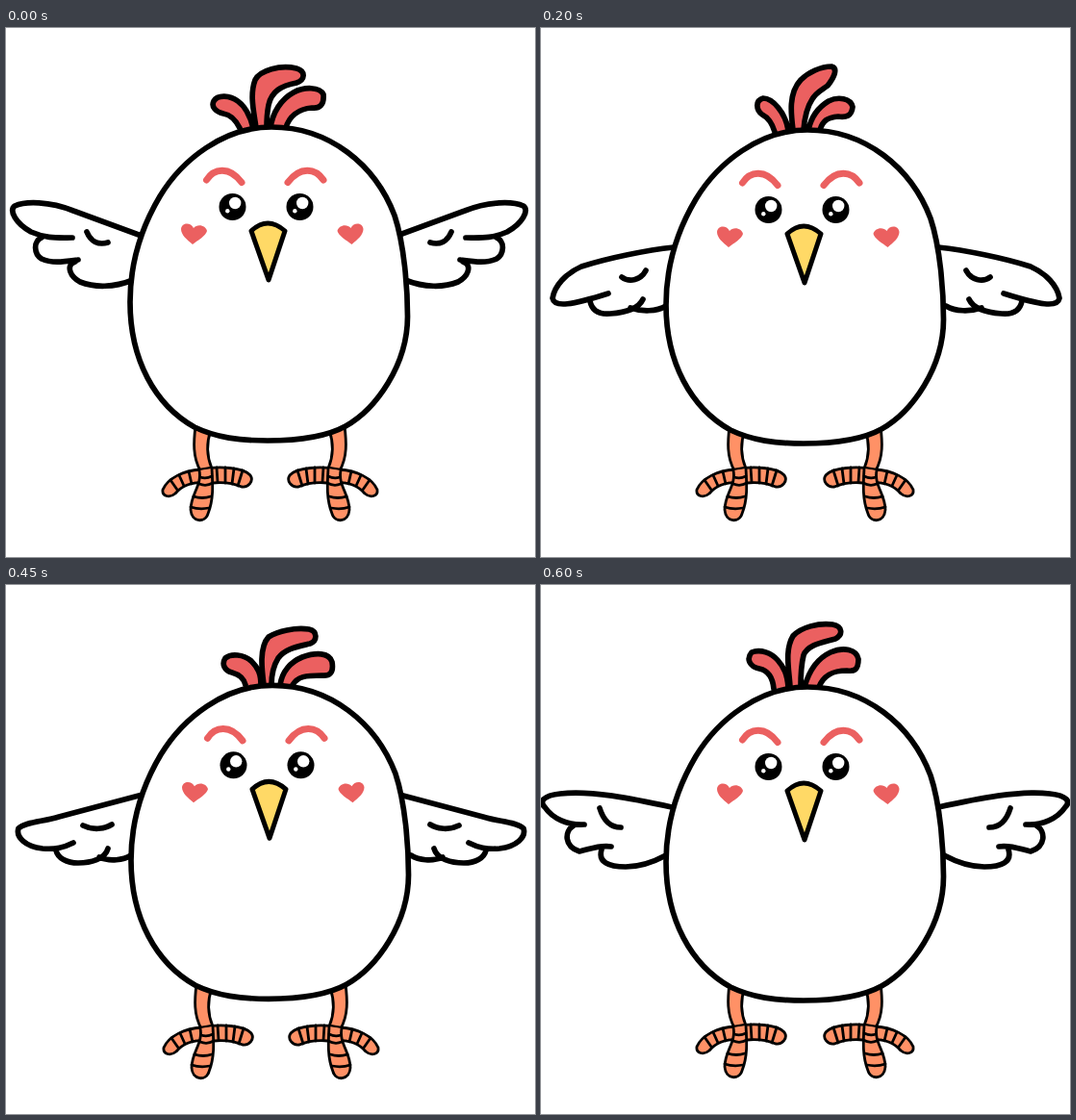
These frames come from a looping animation (550 by 550 pixels, 0.65 s). An HTML page:

```html
<!DOCTYPE html>
<html lang="en">
<head>
<meta charset="utf-8">
<title>Flapping chick</title>
<style>
  html, body { margin: 0; width: 100%; height: 100%; overflow: hidden; background: #fff; }
  svg { display: block; width: 100%; height: 100%; }
  .line { fill: none; stroke: #000; stroke-width: 5.7; stroke-linecap: round; stroke-linejoin: round; }
  .white { fill: #fff; }
  .red { fill: #eb6060; }
  .foot { fill: #ff9166; stroke: #000; stroke-width: 2.8; stroke-linecap: round; stroke-linejoin: round; }
  .brow { fill: none; stroke: #eb6060; stroke-width: 7; stroke-linecap: round; }
</style>
</head>
<body>
<svg viewBox="0 0 550 550">
  <defs>
    <g id="foot" class="foot">
      <path d="M197 414C195 430 194 446 202 460L214 458C209 446 208 432 213 418"/>
      <path d="M163 480C168 468 185 460 202 459C222 455 247 457 254 465C258 471 252 478 245 477C238 474 226 472 215 473C200 471 185 473 176 484C170 489 162 487 163 480Z"/>
      <path d="M201 460C204 476 192 484 192 501C193 514 207 515 210 505C216 490 215 475 214 458"/>
      <path fill="none" d="M171 470L178 480M180 465L185 476M190 461L193 474M219 457L220 472M228 457L228 473M237 458L235 474M246 460L241 476M201 474Q208 477 215 473M202 467Q208 469 214 466M195 487Q204 490 213 487M192 498Q201 501 211 499"/>
    </g>
    <g id="eye">
      <circle r="14"/>
      <circle class="white" cx="2.7" cy="-4" r="6.2"/>
      <circle class="white" cx="-5.2" cy="4.2" r="2.2"/>
    </g>
    <path id="heart" class="red" d="M194 225C188 220 182 215 182 209C183 202 192 202 195 208C199 203 208 205 209 211C208 216 199 221 194 225Z"/>
    <path id="wing" class="line"/>
  </defs>

  <use href="#wing"/>
  <use href="#wing" id="rightWing"/>
  <use href="#foot" id="leftFoot"/>
  <use href="#foot" id="rightFoot"/>
  <path id="comb" class="line red"/>
  <g id="body">
    <path class="line white" d="M276 103C226 103 183 137 160 175C138 212 129 250 129 285C129 345 155 392 196 415C219 426 243 429 272 429C305 429 333 425 353 414C385 396 417.5 350 417.5 300C417.5 270 414 225 404 195C384 142 336 103 276 103Z"/>
    <path class="brow" d="M208.500 158C216 146 232 143 245 160.500M330 158C322 146 306 143 293 160.500"/>
    <use href="#eye" x="235.500" y="186"/>
    <use href="#eye" x="305.500" y="186"/>
    <use href="#heart"/>
    <use href="#heart" transform="translate(553.500) scale(-1 1)"/>
    <path class="line" style="fill:#ffd966;stroke-width:5" d="M255 211Q272 195 290 211L273 262Z"/>
  </g>
</svg>
<script>
  const poses = {
    up: {
      body: [0, 0], leftFoot: [0, 0], rightFoot: [0, 0], mirror: 547,
      wing: 'M138 215L70 190C45 180 20 180 9 185C3 190 10 203 26 212C42 219 52 218 69 218M37 218C28 222 29 235 37 240C48 245 60 243 75 241M72 243C62 246 66 258 77 264C92 270 112 270 132 262M84 212C88 222 96 226 106 223',
      comb: 'M243 104C238 94 233 90 226 89C218 87 213 82 216 76C220 69 233 70 241 76C248 81 253 88 257 104M260 104C258 88 253 70 259 54C264 44 285 38 302 42C312 45 311 54 302 57C286 60 276 66 273 80C271 90 271 97 271 104M275 104C277 88 286 74 299 67C310 61 326 61 330 69C331 80 326 84 318 83C304 84 294 92 291 104'
    },
    falling: {
      body: [1, 1.3], leftFoot: [1, 1], rightFoot: [1, 1], mirror: 551,
      wing: 'M138 219L55 241C40 246 20 246 13 253C10 262 20 272 38 274C52 275 60 273 70 268M52 276C54 284 63 289 75 289C88 289 103 285 106 274M97 283C108 288 122 286 130 281M80 250C90 255 102 254 110 249',
      comb: 'M249 104C247 96 242 93 235 91C227 89 224 82 228 76C234 71 247 72 255 79C262 86 265 92 265 104M268 104C266 88 263 65 273 54C283 48 300 44 315 46C324 48 324 58 316 61C303 64 290 66 283 76C278 84 276 94 276 104M285 104C287 90 296 80 308 75C322 70 336 70 339 80C341 92 336 95 328 94C312 94 303 95 298 104'
    },
    down: {
      body: [1, 3], leftFoot: [-1, 0], rightFoot: [1, 0], mirror: 551,
      wing: 'M138 228C110 231 70 239 42 248C26 255 14 268 12 281C14 291 32 288 70 276M51 284C53 294 60 298 72 297C86 296 101 293 106 282M93 291C105 295 120 295 130 289M84 259C92 265 104 262 109 252',
      comb: 'M243 108C240 98 236 93 230 90C223 85 223 75 231 73C241 73 254 88 257 106M262 106C260 90 257 68 270 54C278 46 291 40 302 40C309 42 305 51 298 60C291 65 286 67 282 74C276 83 274 94 273 106M278 106C281 92 289 82 299 76C309 71 322 73 324 82C323 92 317 93 309 92C298 93 293 96 290 106'
    },
    rising: {
      body: [1, 3], leftFoot: [-1, 0], rightFoot: [1, 0], mirror: 549,
      wing: 'M136 231C95 222 50 213 20 217C2 219 -2 225 4 231C12 243 28 250 45 249M34 250C24 256 24 272 40 277C50 275 60 270 73 272M63 275C59 288 70 293 88 293C104 293 117 288 130 281M61 232C65 245 72 252 83 252',
      comb: 'M242 108C241 96 236 89 227 87C217 85 213 77 219 70C228 66 240 71 246 78C253 86 256 93 257 106M259 106C258 88 253 68 262 53C270 44 289 39 303 41C314 43 314 52 306 56C292 60 277 62 273 73C270 85 270 95 270 106M274 106C279 88 288 76 301 70C315 64 328 67 330 77C330 89 325 90 318 89C304 89 294 93 289 106'
    }
  };

  // Two flaps per loop; the second one falls faster.
  const timeline = [
    [100, 'up'], [200, 'falling'], [300, 'down'], [350, 'rising'],
    [450, 'up'], [500, 'falling'], [600, 'down'], [650, 'rising']
  ];
  const loop = 650;

  const set = (id, name, value) => document.getElementById(id).setAttribute(name, value);
  const mirrored = sum => `translate(${sum} 0) scale(-1 1)`;

  function show({ body, leftFoot, rightFoot, mirror, wing, comb }) {
    set('wing', 'd', wing);
    set('rightWing', 'transform', mirrored(mirror));
    set('comb', 'd', comb);
    set('body', 'transform', `translate(${body})`);
    set('leftFoot', 'transform', `translate(${leftFoot})`);
    set('rightFoot', 'transform', `translate(${rightFoot}) ${mirrored(549)}`);
  }

  let start;
  function frame(now) {
    start ??= now;
    const time = (now - start) % loop;
    show(poses[timeline.find(([end]) => time < end)[1]]);
    requestAnimationFrame(frame);
  }
  show(poses.up);
  requestAnimationFrame(frame);
</script>
</body>
</html>
```
